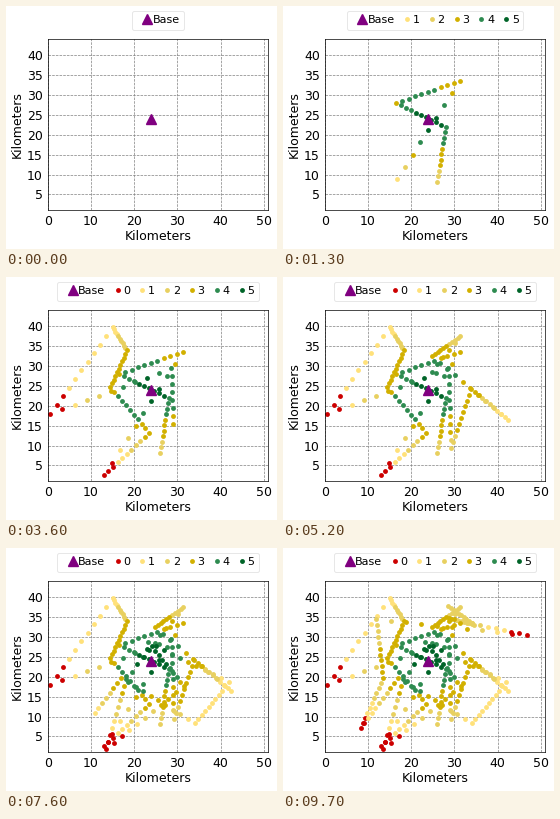
Animation, 271 px wide and 243 px high, one loop 9.8 s. Source, as a matplotlib script:

```python
import numpy as np
import matplotlib.pyplot as plt
from matplotlib.animation import FuncAnimation

W, H, DPI = 271, 243, 100
FRAMES, INTERVAL = 98, 100
PER_FRAME = 3      # samples added in each frame
LEG_STEPS = 10     # samples on each straight leg
BASE = np.array([24, 24])
BAND = 4.04        # signal drops one level per band, in km
COLORS = ["#cc0000", "#ffe17a", "#e8d060", "#d2b000", "#2e8b50", "#006428"]

# Turning points of the flight; everything between is interpolated.
WAYPOINTS = np.array([
    (26, 8.2), (28, 22), (16.4, 28), (31.3, 33.6), (13, 2.6),
    (23.5, 13.2), (14.5, 24.7), (18.3, 34), (15, 39.8), (0.6, 18),
    (28.6, 29.4), (29.2, 9.5), (33.9, 24.3), (42.5, 16.4), (24.8, 32.5),
    (31.4, 37.7), (18.1, 19.5), (13.5, 1.8), (31.5, 17.7), (23.2, 28.8),
    (41.9, 18.6), (34.1, 8.3), (16.9, 19.8), (8.3, 7.2), (13.5, 19.7),
    (11.9, 34.5), (46.8, 30.5), (28.7, 34.8), (34.6, 33.1), (28.6, 37.8),
])


def fly(points, steps):
    """Evenly spaced samples along straight legs between the points."""
    legs = np.arange(len(points))
    t = np.arange(legs[-1] * steps + 1) / steps
    return np.column_stack([np.interp(t, legs, axis) for axis in points.T])


def signal(points):
    """Signal level from 5 near the base down to 0 far away."""
    distance = np.hypot(*(points - BASE).T)
    return np.clip(5 - (distance // BAND).astype(int), 0, 5)


path = fly(WAYPOINTS, LEG_STEPS)
level = signal(path)

plt.rcParams["font.family"] = "DejaVu Sans"
fig = plt.figure(figsize=(W / DPI, H / DPI), dpi=DPI, facecolor="white")
ax = fig.add_axes([41.75 / W, (H - 204.3) / H, 220.4 / W, 170.8 / H])
ax.set(xlim=(0, 51), ylim=(1, 44),
       xticks=range(0, 51, 10), yticks=range(5, 41, 5))
ax.tick_params(length=0, labelsize=9)
ax.set_xlabel("Kilometers", fontsize=9, labelpad=1.6)
ax.set_ylabel("Kilometers", fontsize=9, labelpad=2)
ax.grid(color="gray", linestyle="--", linewidth=0.5)
ax.set_axisbelow(True)
for spine in ax.spines.values():
    spine.set_linewidth(0.5)

base, = ax.plot(*BASE, "^", color="purple", ms=7.8, label="Base", zorder=5)
dots = [ax.plot([], [], "o", color=c, ms=3.5, mew=0, label=str(i))[0]
        for i, c in enumerate(COLORS)]


def draw_legend(handles):
    legend = ax.legend(handles=handles, loc="upper center",
                       bbox_to_anchor=(0.5, 1.2), ncol=len(handles),
                       fontsize=8, handletextpad=-0.5, columnspacing=0.1,
                       edgecolor="0.88")
    legend.get_frame().set_linewidth(0.7)


def update(frame):
    count = frame * PER_FRAME
    shown, seen = path[:count], level[:count]
    handles = [base]
    for i, dot in enumerate(dots):
        pts = shown[seen == i]
        dot.set_data(pts[:, 0], pts[:, 1])
        if len(pts):
            handles.append(dot)
    draw_legend(handles)
    return dots


anim = FuncAnimation(fig, update, frames=FRAMES, interval=INTERVAL,
                     repeat=True, repeat_delay=0, blit=False)
plt.show()
```
